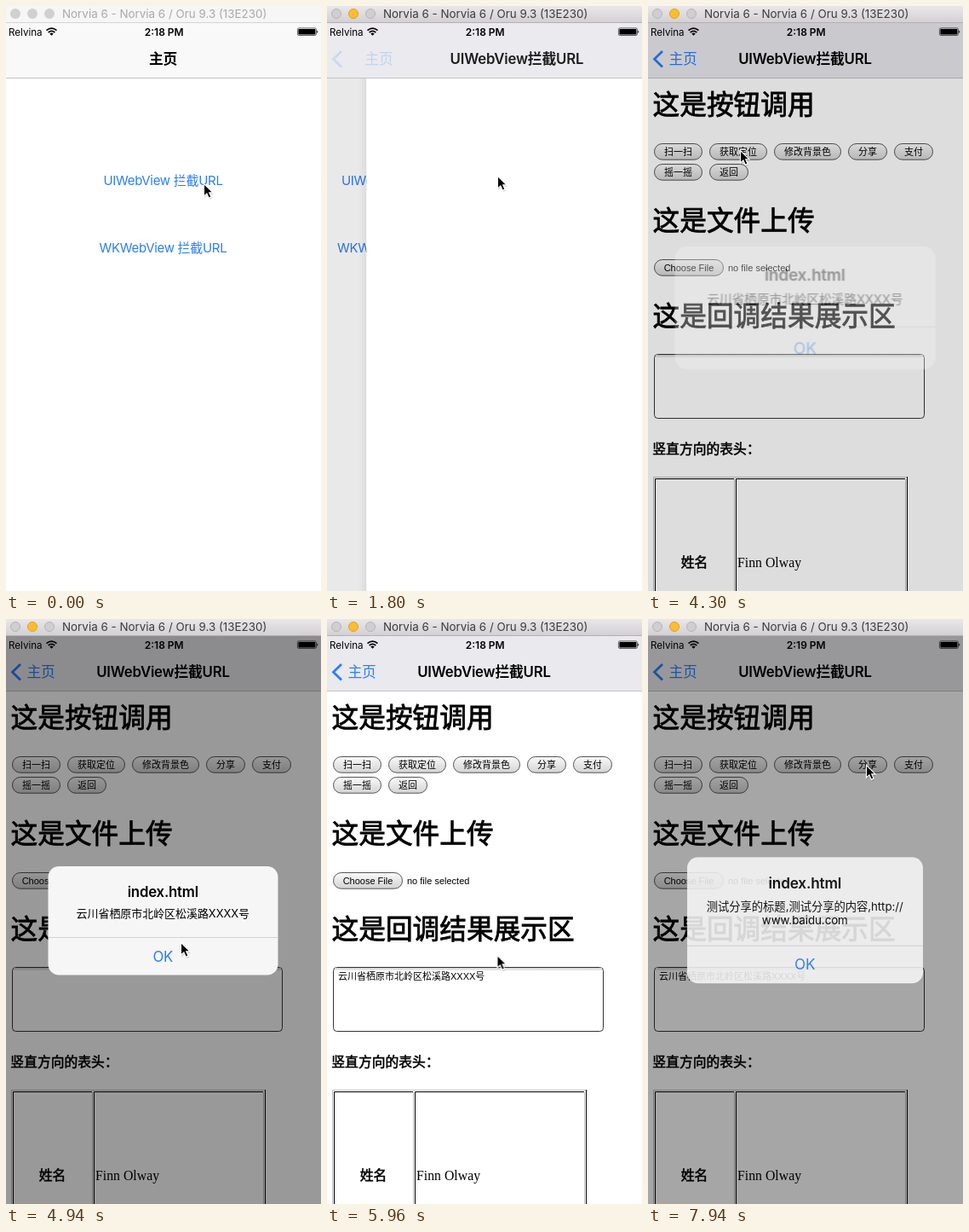
An HTML page that plays this animation: 370x686 px, repeating every 8 s.

```html
<!DOCTYPE html>
<html lang="zh-CN">
<head>
<meta charset="utf-8">
<title>UIWebView demo</title>
<style>
html, body { margin: 0; width: 100%; height: 100%; overflow: hidden; background: #fff; }
svg { display: block; width: 370px; height: 686px; }
text { font-family: Inter, "Noto Sans CJK SC", "Noto Sans CJK", sans-serif; white-space: pre; }
.mid { text-anchor: middle; }
.nav { font-size: 16.8px; letter-spacing: -.012em; }
.semi { font-weight: 600; }
.blue { fill: #2b7df6; }
.link { font-size: 15px; letter-spacing: -.02em; }
.web text { font-family: "Liberation Sans", "Noto Sans CJK SC", "Noto Sans CJK", sans-serif; font-size: 11px; }
.web .h1 { font-size: 31.7px; stroke: #000; stroke-width: .8; }
.web .bold { font-size: 15.8px; stroke: #000; stroke-width: .55; }
.web .cell { font-family: "Liberation Serif", serif; font-size: 15.8px; }
.alert { transform-origin: 184.5px 353.5px; }
.alert .msg { font-size: 13px; letter-spacing: -.005em; }

/* 1% = 80 ms */
svg .a { animation: 8s linear infinite both; }
svg .idle { animation-name: idle; animation-timing-function: step-end; }
svg .active { animation-name: active; animation-timing-function: step-end; }
svg .home { animation-name: home; }
svg .page { animation-name: page; }
svg .shade { animation-name: shade; }
svg .bar { animation-name: fade; }
svg .old { animation-name: old; }
svg .new { animation-name: new; }
svg .back { animation-name: back; }
svg .chev { animation-name: chev; }
svg .load { animation-name: load; animation-timing-function: step-end; }
svg .result { animation-name: result; animation-timing-function: step-end; }
svg .t18 { animation-name: t18; animation-timing-function: step-end; }
svg .t19 { animation-name: t19; animation-timing-function: step-end; }
svg .dim { animation-name: dim; }
svg .one { animation-name: one; }
svg .two { animation-name: two; }
svg .press { animation-name: press; animation-timing-function: step-end; }
svg .cursor { animation-name: cursor; }

@keyframes idle { 0% { opacity: 1 } 18.375%, 100% { opacity: 0 } }
@keyframes active { 0% { opacity: 0 } 18.375%, 100% { opacity: 1 } }
@keyframes home {
  0%, 18.8% { transform: none; animation-timing-function: ease-in-out }
  23.7%, 100% { transform: translateX(-111px) }
}
@keyframes page {
  0%, 18.8% { transform: translateX(382px); animation-timing-function: ease-in-out }
  23.7%, 100% { transform: none }
}
@keyframes shade {
  0%, 18.8% { opacity: 0; animation-timing-function: ease-in-out }
  23.7%, 100% { opacity: .1 }
}
@keyframes fade {
  0%, 18.8% { opacity: 0; animation-timing-function: ease-in-out }
  23.7%, 100% { opacity: 1 }
}
@keyframes old {
  0%, 18.8% { transform: none; opacity: 1; animation-timing-function: ease-in-out }
  22%, 100% { transform: translateX(-120px); opacity: 0 }
}
@keyframes new {
  0%, 18.8% { transform: translateX(317px); opacity: 0; animation-timing-function: ease-in-out }
  23.7%, 100% { transform: none; opacity: 1 }
}
@keyframes back {
  0%, 21.9375% { transform: translateX(30px); opacity: 0 }
  22.5% { transform: translateX(20px); opacity: .2 }
  23.75%, 100% { transform: none; opacity: 1 }
}
@keyframes chev { 0%, 21.9375% { opacity: 0 } 22.5% { opacity: .15 } 23.75%, 100% { opacity: 1 } }
@keyframes load { 0% { opacity: 0 } 25.75%, 100% { opacity: 1 } }
@keyframes result { 0% { opacity: 0 } 73.75%, 100% { opacity: 1 } }
@keyframes t18 { 0% { opacity: 1 } 86.25%, 100% { opacity: 0 } }
@keyframes t19 { 0% { opacity: 0 } 86.25%, 100% { opacity: 1 } }
@keyframes dim {
  0%, 52.8125% { opacity: 0; animation-timing-function: ease }
  57.1875%, 68.625% { opacity: .4; animation-timing-function: ease }
  73.625% { opacity: 0 }
  96.6875% { opacity: 0; animation-timing-function: cubic-bezier(.25,.1,.55,1) }
  100% { opacity: .376 }
}
@keyframes one {
  0%, 52.8125% { transform: scale(1.2); opacity: 0; animation-timing-function: ease }
  57.1875%, 68.625% { transform: none; opacity: 1; animation-timing-function: ease }
  73.625%, 100% { transform: none; opacity: 0 }
}
@keyframes two {
  0%, 96.6875% { transform: scale(1.2); opacity: 0; animation-timing-function: cubic-bezier(.25,.1,.55,1) }
  100% { transform: scale(1.012); opacity: .94 }
}
@keyframes press { 0% { opacity: 0 } 66.125% { opacity: 1 } 69%, 100% { opacity: 0 } }
@keyframes cursor {
  0%, .5% { transform: translate(232px,208px); animation-timing-function: ease-in-out }
  4.75% { transform: translate(305px,246px); animation-timing-function: ease-in-out }
  10.25%, 10.75% { transform: translate(215px,208px) }
  12.5%, 33.25% { transform: translate(200px,199px) }
  35.25% { transform: translate(180px,221px) }
  38.125%, 54.5% { transform: translate(108px,169px); animation-timing-function: ease-in-out }
  61.75%, 63% { transform: translate(205px,379px) }
  65.375%, 80% { transform: translate(199.5px,394px); animation-timing-function: ease-in-out }
  89.625%, 100% { transform: translate(256px,171px) }
}
</style>
</head>
<body>
<svg viewBox="0 0 370 686">
  <defs>
    <linearGradient id="chrome" x2="0" y2="1"><stop stop-color="#e9e7e9"/><stop offset="1" stop-color="#d2d0d2"/></linearGradient>
    <linearGradient id="button" x2="0" y2="1"><stop stop-color="#fafafa"/><stop offset="1" stop-color="#d3d3d3"/></linearGradient>
    <linearGradient id="inset" x2="0" y2="1"><stop stop-color="#ccc"/><stop offset="1" stop-color="#fff"/></linearGradient>
    <linearGradient id="edge"><stop stop-color="#000" stop-opacity="0"/><stop offset="1" stop-color="#000" stop-opacity=".06"/></linearGradient>
  </defs>
  <rect width="370" height="686" fill="#fff"/>

  <g class="a home">
    <text class="link blue mid" x="184.5" y="209.5">UIWebView 拦截URL</text>
    <text class="link blue mid" x="184.5" y="288.5">WKWebView 拦截URL</text>
  </g>
  <rect class="a shade" y="20" width="370" height="666"/>

  <g class="a page">
    <rect x="-9" y="84" width="9" height="602" fill="url(#edge)"/>
    <rect y="84" width="370" height="602" fill="#fff"/>
    <g class="web a load">
      <text class="h1" x="5.5" y="127">这是按钮调用</text>
      <g id="buttons"></g>
      <text class="h1" x="5.5" y="263">这是文件上传</text>
      <text x="94" y="310.5">no file selected</text>
      <text class="h1" x="5.5" y="375">这是回调结果展示区</text>
      <rect x="7.5" y="408.5" width="317" height="75" rx="4" fill="#fff" stroke="#333"/>
      <rect x="9" y="409" width="314" height="4" fill="url(#inset)"/>
      <text class="a result" x="13" y="423">云川省栖原市北岭区松溪路XXXX号</text>
      <text class="bold" x="5.3" y="525">竖直方向的表头：</text>
      <g fill="none" stroke="#bbb">
        <path d="M6.5 686V552.5H304M101.5 555V686M302.5 555V686"/>
        <path stroke="#000" d="M304.5 552V686M8.5 686V554.5H101M103.5 686V554.5H302"/>
      </g>
      <text class="bold" x="38.8" y="658">姓名</text>
      <text class="cell" x="105" y="658">Finn Olway</text>
    </g>
  </g>

  <rect y="19" width="370" height="65" fill="#f9f9f9"/>
  <rect class="a bar" y="19" width="370" height="65" fill="#e9e9ee"/>
  <path d="M0 84.5H370" stroke="#c3c3c6"/>
  <text class="nav semi mid a old" x="184.5" y="68.3">主页</text>
  <text class="nav semi mid a new" x="184.5" y="68.3">UIWebView拦截URL</text>
  <path class="a chev" d="M17 53L7.5 62.2L17 71.5" fill="none" stroke="#2b7df6" stroke-width="2.8"/>
  <text class="nav blue a back" x="24.5" y="68.3">主页</text>

  <text x="3" y="34.5" font-size="11.6">Relvina</text>
  <g fill="none" stroke="#000" stroke-width="1.7">
    <path d="M47.5 28.6Q53.5 23.6 59.5 28.6M49.7 31Q53.5 27.8 57.3 31"/>
    <path d="M53.5 34.8L51.3 32.4Q53.5 30.8 55.7 32.4Z" fill="#000" stroke="none"/>
  </g>
  <g class="semi mid" font-size="12">
    <text class="a t18" x="185.7" y="34.5">2:18 PM</text>
    <text class="a t19" x="185.7" y="34.5">2:19 PM</text>
  </g>
  <rect x="342.4" y="25.9" width="22" height="8.6" rx="1.6" fill="none" stroke="#000" stroke-width=".6"/>
  <rect x="343.4" y="26.9" width="20" height="6.6" rx=".8"/>
  <path d="M365.3 28.5Q367.3 30.2 365.3 32Z"/>

  <rect class="a dim" y="20" width="370" height="666"/>

  <g class="alert a one">
    <rect x="49.5" y="290" width="270" height="127.5" rx="12.5" fill="#f6f6f6"/>
    <path class="a press" d="M49.5 374H319.5V405a12.5 12.5 0 0 1-12.5 12.5H62a12.5 12.5 0 0 1-12.5-12.5Z" fill="#e2e2e2"/>
    <path d="M49.5 373.5H319.5" stroke="#d2d2d4"/>
    <text class="nav semi mid" x="184.3" y="325.5">index.html</text>
    <text class="msg mid" x="184.3" y="350">云川省栖原市北岭区松溪路XXXX号</text>
    <text class="nav blue mid" x="184.3" y="402">OK</text>
  </g>
  <g class="alert a two">
    <rect x="49.5" y="281" width="270" height="144.5" rx="12.5" fill="#f6f6f6"/>
    <path d="M49.5 382.5H319.5" stroke="#d2d2d4"/>
    <text class="nav semi mid" x="184.3" y="317">index.html</text>
    <text class="msg mid" x="184.3" y="342">测试分享的标题,测试分享的内容,http://</text>
    <text class="msg mid" x="184.3" y="357.5">www.baidu.com</text>
    <text class="nav blue mid" x="184.3" y="410">OK</text>
  </g>

  <g font-size="13.4">
    <g class="a idle">
      <rect width="370" height="19.5" fill="#f6f6f6"/>
      <path d="M0 19.5H370" stroke="#d4d4d4"/>
      <g fill="#d0d0d0"><circle cx="11" cy="9" r="6"/><circle cx="31" cy="9" r="6"/><circle cx="51" cy="9" r="6"/></g>
      <text x="66" y="14" fill="#a9a9a9">Norvia 6 - Norvia 6 / Oru 9.3 (13E230)</text>
    </g>
    <g class="a active">
      <rect width="370" height="19.5" fill="url(#chrome)"/>
      <path d="M0 19.5H370" stroke="#b3b1b3"/>
      <g fill="#d0ced0" stroke="#b6b4b6"><circle cx="11" cy="9" r="5.5"/><circle cx="31" cy="9" r="5.5" fill="#fdbd2f" stroke="#dfa023"/><circle cx="51" cy="9" r="5.5"/></g>
      <text x="66" y="14" fill="#3c3c3c">Norvia 6 - Norvia 6 / Oru 9.3 (13E230)</text>
    </g>
  </g>

  <g class="a cursor">
    <path d="M1 2V17L4.5 14L7 19L10 18L8 13H12Z" opacity=".15"/>
    <path d="M.5 .5V15L3.9 11.9L6.3 17.3L9 16.1L6.7 10.9H11Z" stroke="#fff" stroke-width="1.1"/>
  </g>
</svg>
<script>
const buttons = [
  ["扫一扫", 7, 161, 57], ["获取定位", 72, 161, 68], ["修改背景色", 148, 161, 79],
  ["分享", 235, 161, 46], ["支付", 289, 161, 46], ["摇一摇", 7, 185, 57],
  ["返回", 72, 185, 46], ["Choose File", 7, 297, 82]
];
document.getElementById("buttons").innerHTML = buttons.map(([label, x, y, w]) =>
  `<rect x="${x + .5}" y="${y + .5}" width="${w - 1}" height="18.7" rx="9.3" fill="url(#button)" stroke="#555"/>
   <text class="mid" x="${x + w / 2}" y="${y + 13.7}">${label}</text>`).join("");
</script>
</body>
</html>
```
